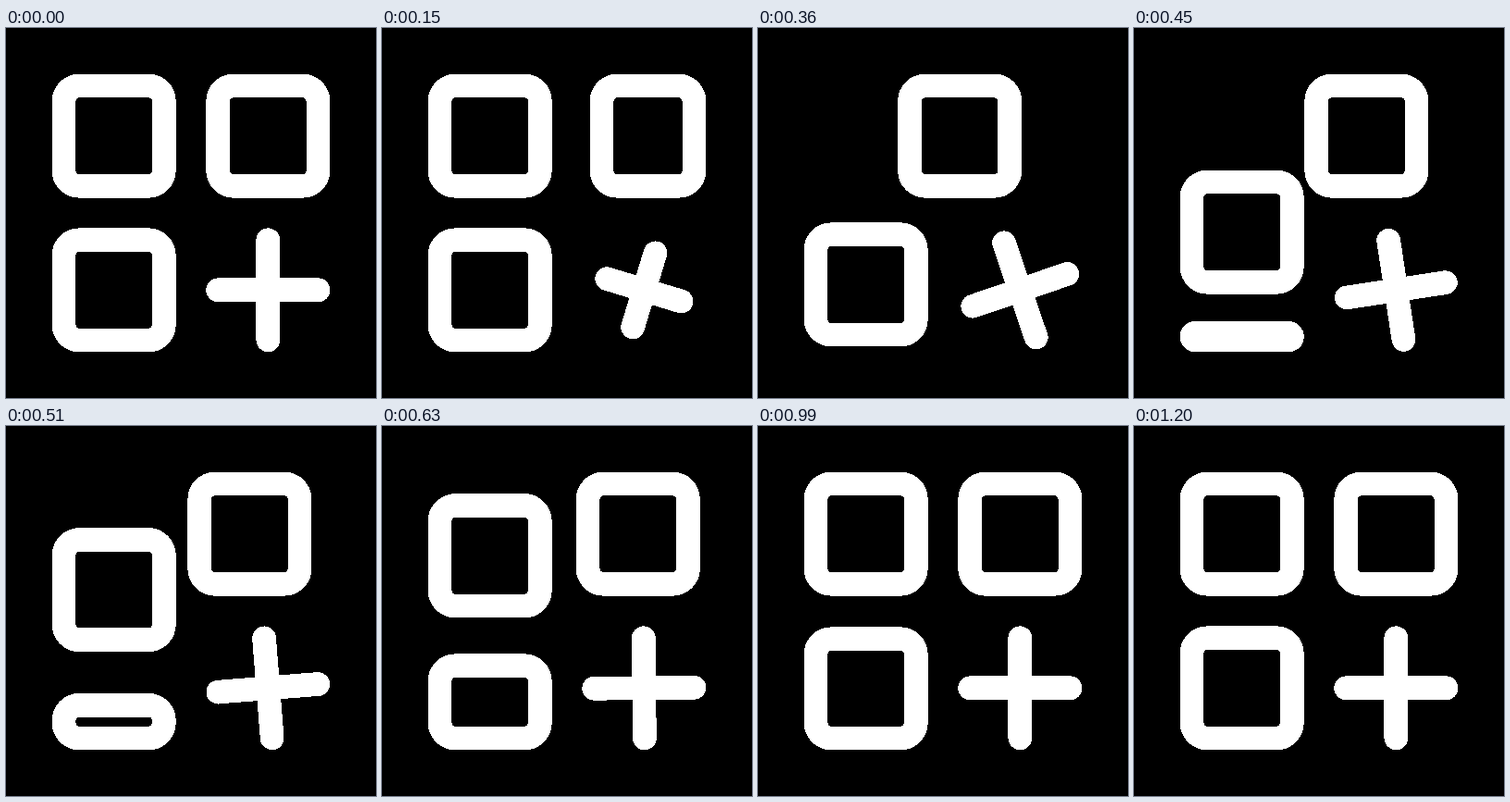
Animation, 400 px wide and 400 px high, one loop 2.23 s. Source, as an HTML page with a canvas:

```html
<!DOCTYPE html>
<html lang="en">
<head>
<meta charset="utf-8">
<title>Grid icon</title>
<style>
  html, body { margin: 0; width: 100%; height: 100%; overflow: hidden; background: #000; }
  /* The filter gives hard edges: partly covered pixels turn white */
  canvas { display: block; width: 100vmin; height: 100vmin; filter: brightness(4) contrast(20); }
</style>
</head>
<body>
<canvas id="stage" width="400" height="400"></canvas>
<script>
const ctx = document.getElementById('stage').getContext('2d');
const LOOP = 2230, STEP = 30;
// Icon grid of 24 units: stroke centre lines of the two columns / rows
const UNIT = 400 / 24;
const NEAR = 3.75, FAR = 13.75, SIZE = 6.5, SHIFT = FAR - NEAR;

const clamp = x => Math.min(1, Math.max(0, x));
const span = (t, start, length) => clamp((t - start) / length);

// Cubic easing with handles (x1, 0) and (x2, 1)
function ease(x, x1, x2) {
  let lo = 0, hi = 1;
  for (let i = 0; i < 30; i++) {
    const u = (lo + hi) / 2, v = 1 - u;
    if (3 * x1 * u * v * v + 3 * x2 * u * u * v + u ** 3 < x) lo = u;
    else hi = u;
  }
  return lo * lo * (3 - 2 * lo);
}

const slide = (t, start) => SHIFT * ease(span(t, start, 690), 0.375, 0);

function box(x, y, w = SIZE, h = SIZE) {
  ctx.beginPath();
  ctx.roundRect(x, y, w, h, Math.min(1, w / 2, h / 2));
  ctx.stroke();
}

function cross(angle, arm) {
  ctx.save();
  ctx.translate(17, 17);
  ctx.rotate(angle);
  ctx.beginPath();
  ctx.moveTo(-arm, 0);
  ctx.lineTo(arm, 0);
  ctx.moveTo(0, -arm);
  ctx.lineTo(0, arm);
  ctx.stroke();
  ctx.restore();
}

function draw(t) {
  ctx.setTransform(1, 0, 0, 1, 0, 0);
  ctx.fillStyle = '#000';
  ctx.fillRect(0, 0, 400, 400);
  ctx.scale(UNIT, UNIT);
  ctx.strokeStyle = '#fff';
  ctx.lineWidth = 1.5;
  ctx.lineCap = ctx.lineJoin = 'round';

  const shrink = SIZE * span(t, 75, 270) ** 2;
  const grow = SIZE * ease(span(t, 371, 740), 0.3, 0);

  box(NEAR + slide(t, 149), NEAR);
  box(NEAR, FAR - slide(t, 290));
  if (shrink < SIZE) box(FAR + shrink, NEAR, SIZE - shrink);
  if (grow > 0.001) box(NEAR, FAR + SIZE - grow, SIZE, grow);

  const turn = ease(span(t, 0, 700), 0.36, 0.22);
  const dip = 0.25 * Math.sin(Math.PI * span(t, 0, 375)) ** 2;
  cross(turn * Math.PI / 2, SIZE / 2 * (1 - dip));
}

const start = performance.now();
function tick() {
  const t = (performance.now() - start) % LOOP;
  draw(Math.floor(t / STEP) * STEP);
  requestAnimationFrame(tick);
}
tick();
</script>
</body>
</html>
```
